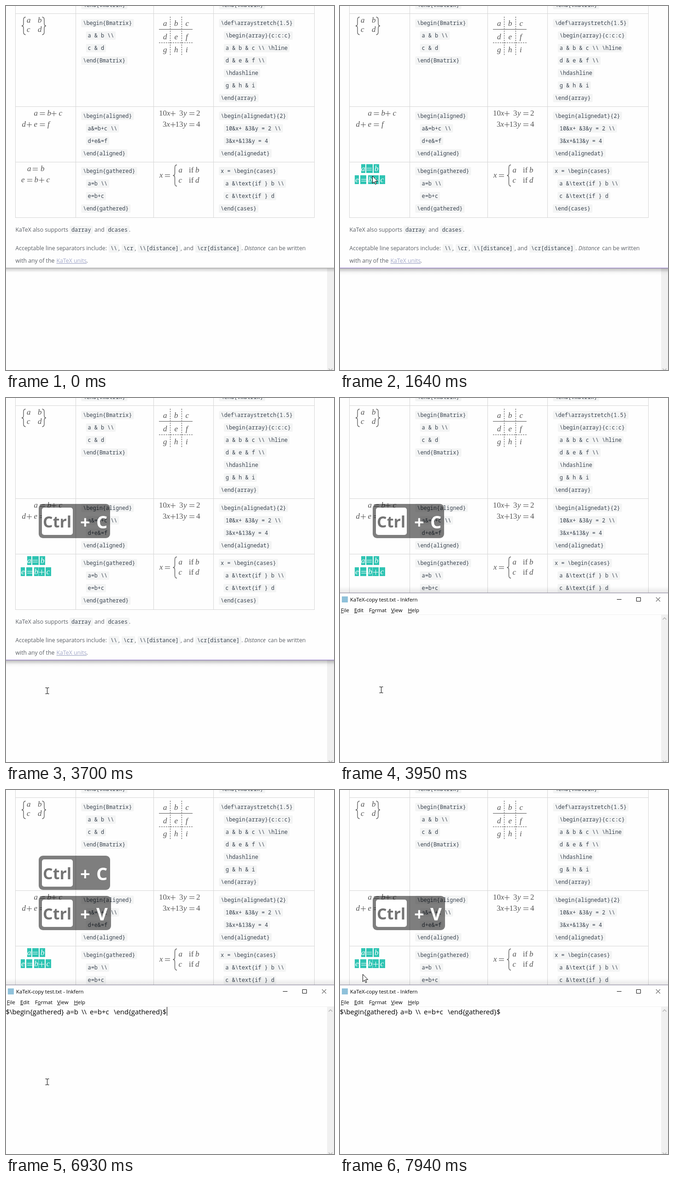
An HTML page that plays this animation: 712 by 787 pixels, repeating every 8 s.

```html
<!DOCTYPE html>
<html lang="en">
<head>
<meta charset="utf-8">
<title>Copy a formula as text</title>
<style>
  html, body { margin: 0; width: 100%; height: 100%; overflow: hidden; background: #fefefe; }
  svg { display: block; width: 100vw; height: 100vh; }
  text { white-space: pre; }
  .code { font: 500 11.8px "Noto Sans Mono", monospace; fill: #3a4450; }
  .body { font: 12.25px "Open Sans", sans-serif; fill: #5c6066; }
  .ui { font: 11.3px "Open Sans", sans-serif; fill: #000; }
  .note { font: 14.9px "Open Sans", sans-serif; fill: #000; }
  .math { font: 17px "Liberation Serif", serif; fill: currentColor; }
  .var, .em { font-style: italic; }
  .link { fill: #a3a9c9; text-decoration: underline; }
  .ink { fill: none; stroke: currentColor; }
  .key { font: 700 34px "Open Sans", sans-serif; fill: #747474; }
  .plain { font: 700 38px "Open Sans", sans-serif; fill: #fff; }
</style>
</head>
<body>
<svg id="stage" viewBox="0 0 712 787" preserveAspectRatio="none"></svg>
<script>
const raw = String.raw;
const esc = s => s.replace(/&/g, '&amp;').replace(/</g, '&lt;');
const text = (cls, x, y, s) => `<text class="${cls}" x="${x}" y="${y}">${esc(s)}</text>`;
const rect = (x, y, w, h, fill, extra = '') => `<rect x="${x}" y="${y}" width="${w}" height="${h}" fill="${fill}" ${extra}/>`;
const path = (d, stroke, extra = '') => `<path d="${d}" fill="none" stroke="${stroke}" ${extra}/>`;
const group = (id, body) => `<g id="${id}">${body}</g>`;

// Inline code on a grey chip; y is the vertical centre.
const chip = (x, y, s, pad = 4) =>
  rect(x - pad, y - 9, s.length * 7.08 + 2 * pad, 18, '#f3f4f4', 'rx="2"') + text('code', x, y + 4, s);

// First and last line sit at the cell edge, the others are indented.
const listing = (x, y, lines) => lines.map((s, i) =>
  chip(x + (i === 0 || i === lines.length - 1 ? 0 : 10.3), y + i * 27, s)).join('');

// Formula tokens as "x:token", separated by blanks.
const math = (y, tokens) => tokens.split(' ').map(tok => {
  const [x, s] = tok.split(':');
  const m = y - 4.3;
  if (s === '+') return `<path class="ink" d="M${x} ${m}h11m-5.5 -5.5v11"/>`;
  if (s === '=') return `<path class="ink" d="M${x} ${m - 2}h11m-11 4h11"/>`;
  return text(/^[a-z]$/.test(s) ? 'math var' : 'math', x, y, s);
}).join('');

const brace = (x, y, h, dir) => {
  const m = y + h / 2, a = x + 4 * dir, b = x + 8.5 * dir;
  return `<path class="ink" stroke-width="1.3" d="M${b} ${y}Q${a} ${y} ${a} ${y + 6}V${m - 5}Q${a} ${m} ${x} ${m}` +
    `Q${a} ${m} ${a} ${m + 5}V${y + h - 6}Q${a} ${y + h} ${b} ${y + h}"/>`;
};

const gathered = math(357, '46:a 58:= 75:b') + math(381, '33:e 46:= 61.5:b 72:+ 87.5:c');

const table =
  path('M20.5 0V457.5M151.5 0V457.5M320.5 0V457.5M450.5 0V457.5M669.5 0V457.5' +
       'M20 16.5H670M20 217.5H670M20 337.5H670M20 457.5H670', '#d6d6d6') +
  chip(167.3, -2, raw`\end{vmatrix}`) + chip(466.5, -2, raw`\end{Vmatrix}`) +
  listing(167.3, 37, [raw`\begin{Bmatrix}`, raw`a & b \\`, 'c & d', raw`\end{Bmatrix}`]) +
  listing(466.5, 37, [raw`\def\arraystretch{1.5}`, raw`\begin{array}{c:c:c}`, raw`a & b & c \\ \hline`,
    raw`d & e & f \\`, raw`\hdashline`, 'g & h & i', raw`\end{array}`]) +
  listing(167.3, 237.5, [raw`\begin{aligned}`, raw`a&=b+c \\`, 'd+e&=f', raw`\end{aligned}`]) +
  listing(466.5, 237.5, [raw`\begin{alignedat}{2}`, raw`10&x+ &3&y = 2 \\`, '3&x+&13&y = 4', raw`\end{alignedat}`]) +
  listing(167.3, 357, [raw`\begin{gathered}`, raw`a=b \\`, 'e=b+c', raw`\end{gathered}`]) +
  listing(466, 357, [raw`x = \begin{cases}`, raw`a &\text{if } b \\`, raw`c &\text{if } d`, raw`\end{cases}`]);

const formulas =
  brace(34, 24, 38, 1) + brace(87, 24, 38, -1) + math(36, '45:a 69:b') + math(56, '45:c 69:d') +
  math(43, '341:a 365:b 389.5:c') + math(72, '341:d 365.5:e 390:f') + math(100, '341:g 365:h 390:i') +
  '<path class="ink" d="M332 50.5H405"/>' +
  '<path class="ink" stroke-dasharray="3 2" d="M356.5 23V108M381.5 23V108M332 79.5H405"/>' +
  math(237, '60.5:a 73.5:= 89.5:b 98.5:+ 114.5:c') + math(261, '34.5:d 45:+ 60.5:e 73.5:= 90:f') +
  math(237, '332:10 349:x 357:+ 376:3 385:y 398:= 413:2') +
  math(261, '340:3 348.5:x 357:+ 367.5:13 385:y 398:= 413:4') +
  math(371, '333:x 345:=') + brace(362.5, 343.5, 46, 1) +
  math(360, '374.5:a 397:if 411:b') + math(382, '374.5:c 397:if 411:d') +
  group('normal', gathered);

const prose =
  text('body', 20.5, 488, 'KaTeX also supports') + chip(142, 484, 'darray') + text('body', 192, 488, 'and') +
  chip(221.5, 484, 'dcases') + text('body', 267, 488, '.') +
  text('body', 20.5, 528, 'Acceptable line separators include:') + chip(227, 524, raw`\\`) +
  text('body', 244, 528, ',') + chip(255, 524, raw`\cr`) + text('body', 279.5, 528, ',') +
  chip(290, 524, raw`\\[distance]`) + text('body', 379, 528, ', and') + chip(415, 524, raw`\cr[distance]`) +
  text('body', 511, 528, '.') + text('body em', 517.5, 528, 'Distance') +
  text('body', 569, 528, 'can be written') + text('body', 20.5, 555, 'with any of the') +
  text('body link', 109.5, 555, 'KaTeX units') + text('body', 174.5, 555, '.');

const selection = group('selected',
  [[46, 342, 9], [57, 342, 14], [73, 342, 12], [32, 366, 9], [44, 366, 13], [61, 366, 9], [70.5, 366, 13.5], [86, 366, 12]]
    .map(([x, y, w]) => rect(x, y, w, 19, '#2fc4b3')).join('') +
  `<g color="#fff">${gathered}</g>`);

const chevron = (y, dir) => path(`M700.5 ${y}l4 ${4 * dir}l4 ${-4 * dir}`, '#b4b4b4', 'stroke-width="1.5"');

const menu = (x, a, hot, b) =>
  `<text class="ui" x="${x}" y="463">${a}<tspan text-decoration="underline">${hot}</tspan>${b}</text>`;

const pastedText =
  text('note', -0.5, 485, raw`$\begin{gathered}`) + text('note', 131, 485, 'a=b') + text('note', 164, 485, raw`\\`) +
  text('note', 182, 485, 'e=b+c') + text('note', 234, 485, raw`\end{gathered}$`);

const editor = group('editor',
  group('editorShade', rect(0, 407, 712, 14, 'url(#up)')) +
  rect(0, 421, 712, 366, '#fefefe') + path('M0 421.5H712', '#85809a') +
  rect(4, 429, 13, 13, '#8fc1da') + text('ui', 22, 440, 'KaTeX-copy test.txt - Inkfern') +
  path('M601 435.5h10M643.5 431.5h9v8h-9zM686 431l9 9m0 -9l-9 9', '#111') +
  menu(2, '', 'F', 'ile') + menu(31, '', 'E', 'dit') + menu(63, 'F', 'o', 'rmat') +
  menu(111, '', 'V', 'iew') + menu(147.5, '', 'H', 'elp') +
  path('M0 468.5H712', '#f0f0f0') + rect(697, 469, 15, 318, '#f0f0f0') + chevron(479, -1) + chevron(784, 1) +
  group('pasted', pastedText) + group('caret', path('M349.5 469V488', '#000')));

const badge = (id, letter, w) => group(id,
  rect(71, 0, w, 74, '#000', 'rx="9" fill-opacity=".5"') + rect(78, 8, 67, 59, '#fff', 'rx="5"') +
  text('key', 80, 51, 'Ctrl') + text('plain', 161, 53, '+') + text('plain', 196, 53, letter));

const fade = (id, from, to) => `<linearGradient id="${id}" x2="0" y2="1">` +
  `<stop stop-opacity="${from}"/><stop offset="1" stop-opacity="${to}"/></linearGradient>`;

document.getElementById('stage').innerHTML =
  `<defs>${fade('up', 0, .09)}${fade('near', .2, 0)}${fade('far', .08, 0)}</defs>` +
  rect(0, 0, 712, 787, '#fefefe') + rect(697, 567, 15, 220, '#f0f0f0') + chevron(784, 1) +
  `<g color="#555">${table}${formulas}</g>` + prose + selection +
  rect(0, 567, 712, 9, 'url(#near)') + group('focusShade', rect(0, 567, 712, 15, 'url(#far)')) +
  path('M0 566.5H712', '#999', 'id="edge"') +
  editor + badge('copy', 'C', 155) + badge('paste', 'V', 157) +
  group('pointer',
    '<path id="arrow" d="M.5 .5V16.5L4.2 13L6.7 18.6L9 17.6L6.6 12H11.6Z" fill="#fff" stroke="#000"/>' +
    group('beam', path('M-3.5 -6.5H-1Q.5 -6.5 .5 -5Q.5 -6.5 2 -6.5H4.5M.5 -5.5V5.5M-3.5 6.5H-1Q.5 6.5 .5 5Q.5 6.5 2 6.5H4.5', '#000')));

const $ = {};
document.querySelectorAll('#stage [id]').forEach(el => $[el.id] = el);
const show = (name, on) => $[name].style.display = on ? '' : 'none';
const clamp = v => Math.max(0, Math.min(1, v));

// Progress in n discrete pictures between two times.
const steps = (t, from, to, n) => clamp(Math.floor((t - from) / (to - from) * (n - 1) + 1e-6) / (n - 1));

const moves = [
  { from: 510, to: 1090, n: 10, pts: [[395, 641], [310, 555], [190, 445], [105, 380], [74, 361], [70, 367]] },
  { from: 3260, to: 3450, n: 4, pts: [[72, 400], [79, 490], [85, 590], [88, 623]] },
  { from: 3630, to: 3950, n: 4, pts: [[89, 633], [89, 631]] },
  { from: 6930, to: 7120, n: 4, pts: [[89, 631], [70, 540]] },
  { from: 7680, to: 7940, n: 5, pts: [[5, 340], [22, 366], [36, 384], [45, 394], [49, 398]] }
];

function pointerAt(t) {
  const move = moves.filter(m => t >= m.from).pop() || moves[0];
  const at = steps(t, move.from, move.to, move.n) * (move.pts.length - 1);
  const i = Math.min(Math.floor(at), move.pts.length - 2);
  const [a, b] = [move.pts[i], move.pts[i + 1]];
  return a.map((v, k) => Math.round(v + (b[k] - v) * (at - i)));
}

function render(t) {
  const focused = t >= 1320, selected = t >= 1560, front = t >= 3736, pasted = t >= 4820;

  show('normal', !selected);
  show('selected', selected);
  $.edge.setAttribute('stroke', focused ? '#8468c0' : '#999');
  $.focusShade.setAttribute('opacity', focused ? .4 + .6 * steps(t, 1320, 1560, 4) : 0);

  show('editor', front);
  $.editorShade.setAttribute('opacity', .4 + .6 * steps(t, 3736, 3950, 3));
  show('pasted', pasted);
  show('caret', pasted && (t < 5300 || t >= 5860 && t < 6380 || t >= 6930 && t < 7430));

  show('copy', t >= 2720 && t < 7740);
  $.copy.setAttribute('transform', `translate(0 ${pasted ? 142 : 229})`);
  show('paste', pasted);
  $.paste.setAttribute('transform', 'translate(0 229)');

  const [x, y] = pointerAt(t);
  const beam = y > (front ? 468 : 567);
  show('pointer', t >= 510 && t < 7120 || t >= 7680);
  show('arrow', !beam);
  show('beam', beam);
  $.pointer.setAttribute('transform', `translate(${x} ${y})`);
}

const start = performance.now();
(function tick() {
  render((performance.now() - start) % 8000);
  requestAnimationFrame(tick);
})();
</script>
</body>
</html>
```
